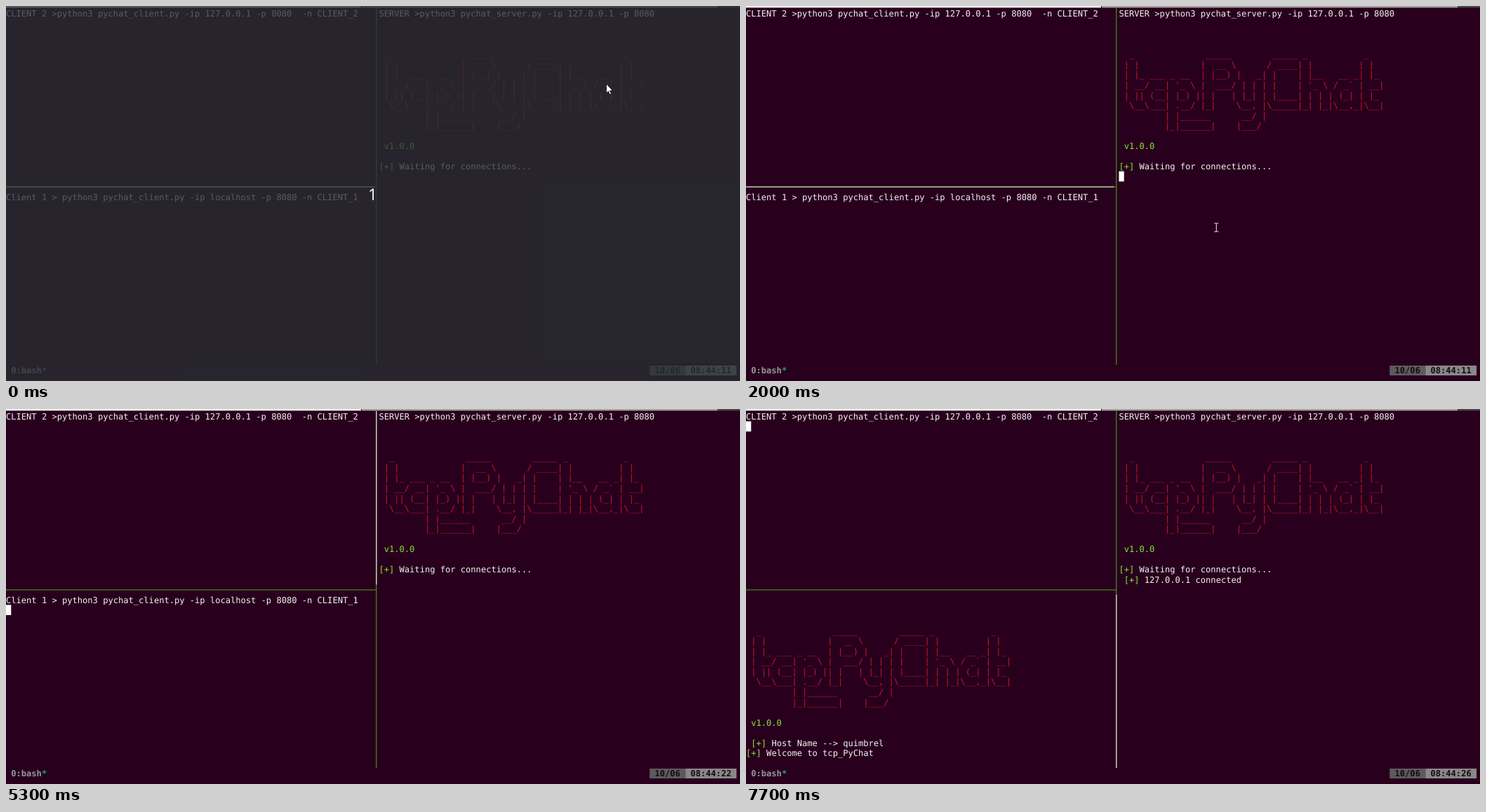
An HTML page that plays this animation: 1046x535 px, repeating every 8000 ms.

```html
<!DOCTYPE html>
<html lang="en">
<head>
<meta charset="utf-8">
<title>tcp_PyChat terminal</title>
<style>
  html, body { margin: 0; width: 100%; height: 100%; overflow: hidden; background: #28001e; }
  svg { display: block; }
  text { white-space: pre; text-rendering: geometricPrecision; }
  .mono { font: 12.09px "DejaVu Sans Mono", monospace; }
  .bold { font-weight: bold; }
</style>
</head>
<body>
<svg id="stage" width="1046" height="535" viewBox="0 0 1046 535"></svg>
<script>
const LOOP = 8000, CW = 7.28, CH = 14.55, TOP = 3, BASE = 12.1;
const WHITE = '#f4f2f0', GREEN = '#8ae234', RED = '#cc1422';
const LINE = '#4a9212', PALE = '#dcdfd8';
const stage = document.getElementById('stage');
const timed = [];

function add(tag, attrs, text) {
  const el = document.createElementNS('http://www.w3.org/2000/svg', tag);
  for (const k in attrs) el.setAttribute(k, attrs[k]);
  if (text) el.textContent = text;
  stage.append(el);
  return el;
}
const during = (from, to, ...els) => els.forEach(el => timed.push({ el, from, to }));
const rect = (x, y, width, height, fill) => add('rect', { x, y, width, height, fill });
const put = (col, row, text, fill = WHITE, cls = '') =>
  add('text', { x: col * CW, y: TOP + row * CH + BASE, fill, class: 'mono ' + cls }, text);
const note = (col, row, text) => [put(col, row, '[+]', GREEN), put(col + 4, row, text)];
const vline = (y1, y2, fill) => rect(527.2, y1, 1.2, y2 - y1, fill);
const hline = (x2, fill) => rect(0, 257.5, x2, 1.1, fill);

const ART = [
  " _              _____        _____ _           _",
  "| |            |  __ \\      / ____| |         | |",
  "| |_ ___ _ __  | |__) |   _| |    | |__   __ _| |_",
  "| __/ __| '_ \\ |  ___/ | | | |    | '_ \\ / _` | __|",
  "| || (__| |_) || |   | |_| | |____| | | | (_| | |_",
  " \\__\\___| .__/ |_|    \\__, |\\_____|_| |_|\\__,_|\\__|",
  "        | |______      __/ |",
  "        |_|______|    |___/"
];
const banner = (col, row) => [
  ...ART.map((line, i) => put(col, row + i, line, RED)),
  put(col, row + 9, 'v1.0.0', GREEN)
];

// Window edge above the terminal
rect(0, 0, 506, 2.4, '#efedeb');
rect(507, 0, 507, 2.4, '#a8a29b');
rect(1014, 0, 32, 2.4, '#4b463f');

// Pane borders, pale beside the inactive panes
vline(TOP, 512, LINE);
hline(528, LINE);
during(0, 3000, hline(524.5, PALE));
during(3000, 6900, vline(TOP, 250.5, PALE));
during(6900, LOOP, vline(265, 512, PALE));

// Panes
put(0, 0, 'CLIENT 2 >python3 pychat_client.py -ip 127.0.0.1 -p 8080  -n CLIENT_2');
put(73, 0, 'SERVER >python3 pychat_server.py -ip 127.0.0.1 -p 8080');
banner(74, 4);
note(73, 15, 'Waiting for connections...');
during(5500, LOOP, ...note(74, 16, '127.0.0.1 connected'));
during(0, 5500, put(0, 18, 'Client 1 > python3 pychat_client.py -ip localhost -p 8080 -n CLIENT_1'));
during(5500, LOOP,
  ...banner(1, 21),
  ...note(1, 32, 'Host Name --> quimbrel'),
  ...note(0, 33, 'Welcome to tcp_PyChat'));

// Status line
rect(126 * CW, 513, 7 * CW, 14, '#5e5a5c');
rect(133 * CW, 513, 10 * CW, 14, '#8a8788');
put(127, 35, '10/06', '#120c10', 'bold');
const clock = put(134, 35, '08:44:11', '#120c10', 'bold');
const job = put(1, 35, '0:bash', '#9a9698', 'bold');
const star = put(7, 35, '*', '#12a08a', 'bold');

const STATUS = [
  [0, 'bash', 11], [2400, 'python3', 21], [3000, 'bash', 22],
  [6700, 'python3', 26], [6900, 'bash', 26]
];

// Block cursor: time, column, row; no cell means blinked off
const CURSOR = [
  [0], [600, 73, 16], [1200], [1800, 73, 16],
  [3000, 57, 18], [3300], [3900, 57, 18], [4500], [5100, 57, 18],
  [5300, 0, 19], [5500, 0, 34], [5700], [6300, 0, 34],
  [6900, 56, 0], [7400], [7500, 56, 0], [7700, 0, 1]
];
const block = rect(0, 0, CW, CH, '#ffffff');

// Pointer: time, x, y
const POINTER = [
  [0, 857, 113], [1600, 838, 148], [1700, 782, 226], [1800, 718, 293],
  [1900, 680, 324], [2000, 670.3, 316], [2500]
];
const beam = add('path', {
  d: 'M-3-6H-1L0-5L1-6H3M0-5V5M-3 6H-1L0 5L1 6H3',
  fill: 'none', stroke: '#dedad8', 'stroke-width': 1.1
});

// Countdown shade before recording
during(0, 500,
  add('rect', { width: 1046, height: 535, fill: '#273033', 'fill-opacity': 0.77 }),
  add('text', {
    x: 522.5, y: 276.5, fill: '#ffffff', 'text-anchor': 'middle',
    style: 'font: 23px "Open Sans", "Noto Sans", sans-serif'
  }, '1'),
  add('path', {
    d: 'M855.5 111V124.2L858.4 121.6L860.4 126.2L862.6 125.2L860.6 120.8H864.6Z',
    fill: '#ffffff', stroke: '#15131a', 'stroke-width': 0.9
  }));

const at = (table, t) => table.findLast(step => step[0] <= t);
const show = (el, on) => { el.style.visibility = on ? 'visible' : 'hidden'; };
function move(el, x, y) {
  show(el, x !== undefined);
  if (x !== undefined) el.setAttribute('transform', `translate(${x} ${y})`);
}

function draw(t) {
  for (const { el, from, to } of timed) show(el, t >= from && t < to);
  const [, name, sec] = at(STATUS, t);
  job.textContent = '0:' + name;
  star.setAttribute('x', (3 + name.length) * CW);
  clock.textContent = '08:44:' + sec;
  const [, col, row] = at(CURSOR, t);
  move(block, col === undefined ? col : col * CW, TOP + row * CH);
  const [, x, y] = at(POINTER, t);
  move(beam, t < 500 ? undefined : x, y);
}

const start = performance.now();
function tick() {
  draw((performance.now() - start) % LOOP);
  requestAnimationFrame(tick);
}
tick();
</script>
</body>
</html>
```
